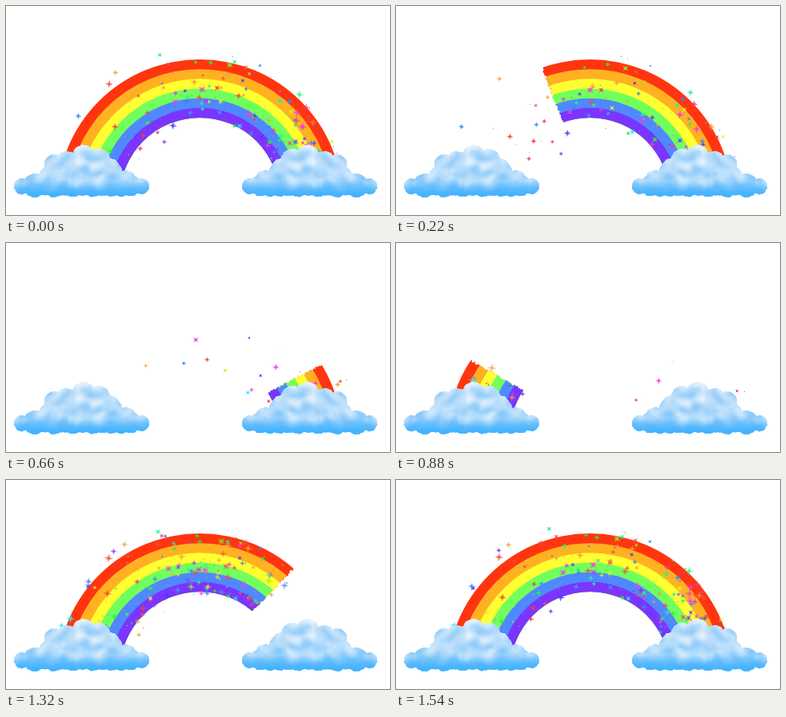
Recreate the animation shown at these times as an HTML page with a canvas. Size 480 by 262 pixels, loop 1650 ms.

```html
<!DOCTYPE html>
<html lang="en">
<head>
<meta charset="utf-8">
<title>Rainbow</title>
<style>
  html, body { margin: 0; width: 100%; height: 100%; overflow: hidden; background: #fff; }
  canvas { display: block; width: 480px; height: 262px; }
</style>
</head>
<body>
<canvas id="stage" width="480" height="262"></canvas>
<script>
const W = 480, H = 262;
const ctx = document.getElementById('stage').getContext('2d');
const STEP = 110, STEPS = 15, TAU = 2 * Math.PI;
const BANDS = ['#ff3510', '#ffb122', '#ffff32', '#70ff5c', '#5088ff', '#7a35ff'];
const CX = 242.3, OUTER = 178.4, INNER = 100, END = 77;

function seeded(seed) {
  return () => {
    seed = (seed + 0x6d2b79f5) | 0;
    let t = Math.imul(seed ^ (seed >>> 15), 1 | seed);
    t = (t + Math.imul(t ^ (t >>> 7), 61 | t)) ^ t;
    return ((t ^ (t >>> 14)) >>> 0) / 4294967296;
  };
}

// The arcs are not quite concentric: wider ones sit lower.
const centerY = r => 240 + 5.4 * (r - INNER) / (OUTER - INNER);
const polar = (deg, r) => {
  const a = deg * Math.PI / 180;
  return [CX + r * Math.sin(a), centerY(r) - r * Math.cos(a)];
};

// Ends of the visible arc, in degrees clockwise from the top.
const clampEnd = deg => Math.max(-END, Math.min(END, deg));
const growth = k => -56.5 + 24.4 * (k - 8);
const tailAt = k => k > 0 && k < 7 ? 19.5 * (k - 3) : -END;
const headAt = k => k < 7 ? END : clampEnd(growth(k));

// ---- clouds ----
function makeCloud() {
  const layer = document.createElement('canvas');
  layer.width = W;
  layer.height = H;
  const g = layer.getContext('2d');
  const rnd = seeded(5);
  // Crown lobes by hand, the flat foot as a row.
  const lobes = [
    [97, 188, 14], [76, 195, 13], [60, 198, 12], [116, 193, 14], [130, 202, 11],
    [53, 212, 11], [37, 221, 11], [20, 226, 10], [150, 218, 12], [169, 226, 10]
  ];
  for (let x = 36; x <= 156; x += 12) lobes.push([x, 225, 12 + 3 * Math.sin(x / 8) ** 2]);
  for (let x = 72; x <= 132; x += 15) lobes.push([x, 210, 14]);

  const shape = new Path2D();
  for (const [x, y, r] of lobes) {
    shape.moveTo(x + r, y);
    for (let a = 0.2; a < TAU; a += 0.2) {
      const q = r + (rnd() - 0.5) * 1.2;
      shape.lineTo(x + q * Math.cos(a), y + q * Math.sin(a));
    }
    shape.closePath();
  }
  g.clip(shape);

  const base = g.createLinearGradient(0, 174, 0, 240);
  base.addColorStop(0, '#e2effc');
  base.addColorStop(0.4, '#bcdefb');
  base.addColorStop(0.7, '#94d0fd');
  base.addColorStop(1, '#42b0ff');
  g.fillStyle = base;
  g.fillRect(0, 165, 200, 80);

  const glow = (x, y, r, rgb, alpha) => {
    const f = g.createRadialGradient(x, y, 0, x, y, r);
    f.addColorStop(0, `rgba(${rgb},${alpha})`);
    f.addColorStop(1, `rgba(${rgb},0)`);
    g.fillStyle = f;
    g.fillRect(x - r, y - r, 2 * r, 2 * r);
  };
  for (let i = 0; i < 130; i++) {
    const x = 12 + 166 * rnd(), y = 178 + 56 * rnd(), r = 5 + 9 * rnd();
    glow(x, y, r, '96,180,245', 0.32);
    glow(x - r * 0.4, y - r * 0.7, r, '238,247,255', 0.42);
  }
  const foot = g.createLinearGradient(0, 220, 0, 241);
  foot.addColorStop(0, 'rgba(60,178,255,0)');
  foot.addColorStop(1, 'rgba(60,178,255,.8)');
  g.fillStyle = foot;
  g.fillRect(0, 220, 200, 22);
  return layer;
}
const cloud = makeCloud();

function drawClouds() {
  ctx.drawImage(cloud, 0, 0);
  ctx.save();
  ctx.translate(474, 0);
  ctx.scale(-1, 1);
  ctx.drawImage(cloud, 0, 0);
  ctx.restore();
}

// ---- rainbow ----
function drawRainbow(k) {
  const from = tailAt(k), to = headAt(k);
  if (to <= from) return;
  const rnd = seeded(k + 40);
  const rough = () => (rnd() - 0.5) * 1.2;
  const width = (OUTER - INNER) / BANDS.length;
  ctx.save();
  ctx.beginPath();
  for (let r = INNER - 2; r <= OUTER + 2; r += 1.5) ctx.lineTo(...polar(from + rough(), r));
  for (let a = from; a < to; a += 2) ctx.lineTo(...polar(a, OUTER + 2));
  for (let r = OUTER + 2; r >= INNER - 2; r -= 1.5) ctx.lineTo(...polar(to + rough(), r));
  for (let a = to; a > from; a -= 2) ctx.lineTo(...polar(a, INNER - 2));
  ctx.clip();
  BANDS.forEach((color, i) => {
    const r = OUTER - i * width;
    ctx.fillStyle = color;
    ctx.beginPath();
    ctx.arc(CX, centerY(r), r, 0, TAU);
    ctx.arc(CX, centerY(INNER), INNER, 0, TAU, true);
    ctx.fill();
  });
  ctx.restore();
}

// ---- sparkles: thrown off by the growing head, then falling ----
const FALL = 0.62;

function makeSparks() {
  const rnd = seeded(23);
  return Array.from({ length: 310 }, () => {
    const birth = 7.5 + 6.2 * rnd();
    const [x, y] = polar(growth(birth) + 8 * (rnd() - 0.5), INNER - 4 + 82 * rnd());
    const rise = 1 + 4.5 * rnd();
    return {
      birth, x,
      vx: (rnd() - 0.45) * 10,
      peak: rise,
      top: y - FALL * rise * rise,
      life: 2 + 9.5 * rnd() ** 1.6,
      hue: Math.floor(rnd() * 12) * 30 + 10 * rnd(),
      size: rnd() < 0.4 ? 1 + rnd() : 3 + 3 * rnd(),
      turn: rnd() < 0.7 ? 0.1 : 0.7
    };
  });
}
const sparks = makeSparks();

function drawStar(x, y, size, { hue, turn }, alpha) {
  const light = hue > 40 && hue < 200 ? 55 : 60;
  ctx.strokeStyle = ctx.fillStyle = `hsl(${hue},90%,${light}%)`;
  ctx.globalAlpha = alpha;
  if (size < 2) {
    ctx.fillRect(Math.round(x), Math.round(y), Math.round(size), Math.round(size));
    return;
  }
  for (let i = 0; i < 4; i++) {
    const a = turn + i * Math.PI / 4, r = i % 2 ? size * 0.55 : size;
    const dx = Math.cos(a) * r, dy = Math.sin(a) * r;
    ctx.beginPath();
    ctx.moveTo(x - dx, y - dy);
    ctx.lineTo(x + dx, y + dy);
    ctx.stroke();
  }
  ctx.globalAlpha = alpha * 0.35;
  ctx.beginPath();
  ctx.arc(x, y, size * 0.6, 0, TAU);
  ctx.fill();
}

function drawSparks(k) {
  for (const s of sparks) {
    const age = (k - s.birth + STEPS) % STEPS;
    if (age > s.life) continue;
    const size = s.size * (1 - 0.4 * age / s.life);
    const y = s.top + FALL * (age - s.peak) ** 2;
    if (y < 220) drawStar(s.x + s.vx * age, y, size, s, 0.6 + 0.3 * Math.min(1, age / 5));
  }
  ctx.globalAlpha = 1;
}

function draw(k) {
  ctx.fillStyle = '#fff';
  ctx.fillRect(0, 0, W, H);
  drawRainbow(k);
  drawSparks(k);
  drawClouds();
}

let shown = -1;
function tick() {
  const k = Math.floor(performance.now() / STEP) % STEPS;
  if (k !== shown) draw(shown = k);
  requestAnimationFrame(tick);
}
tick();
</script>
</body>
</html>
```
